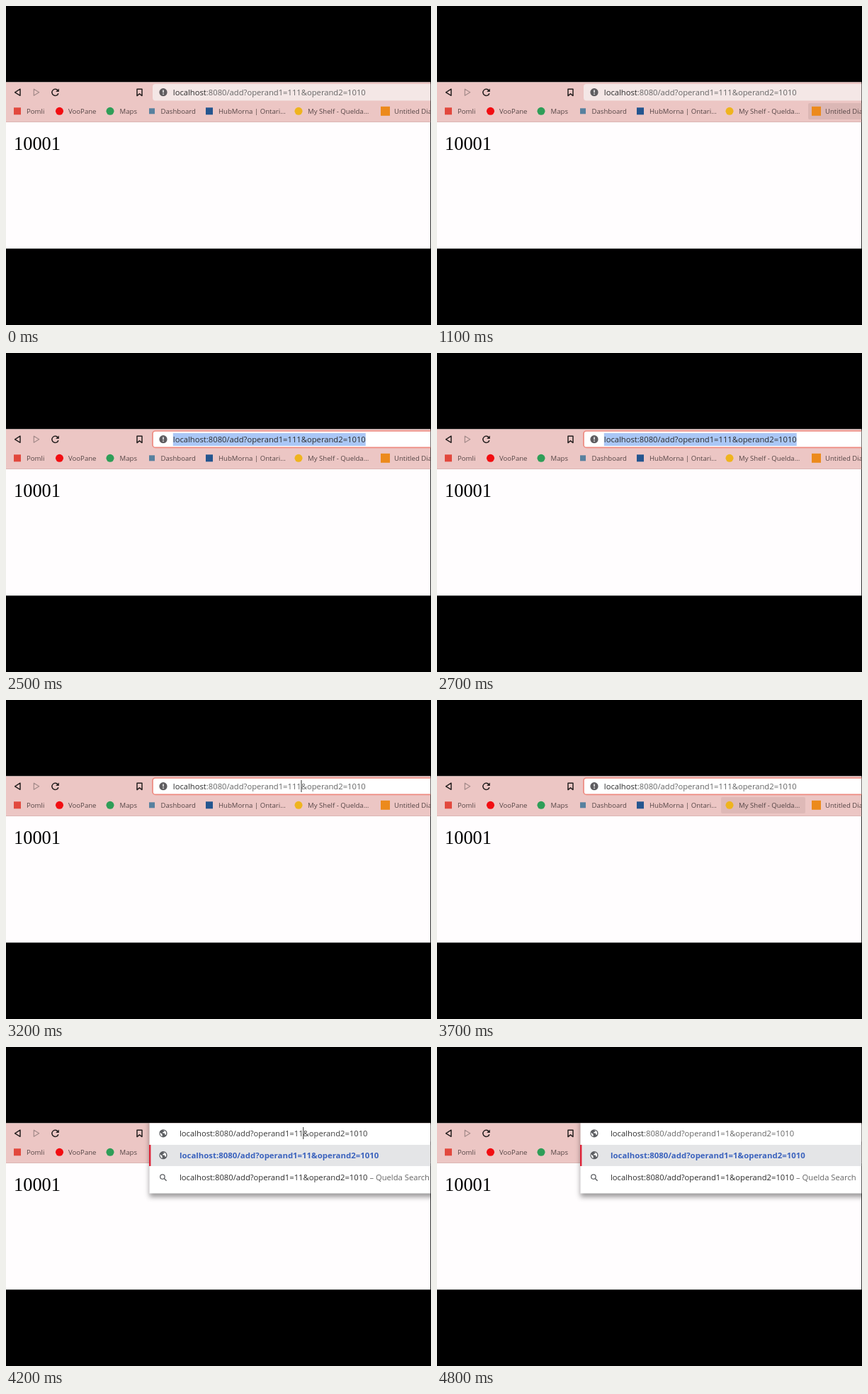
These frames come from a looping animation (600x450 px, 5 s). An HTML page:

```html
<!DOCTYPE html>
<html lang="en">
<head>
<meta charset="utf-8">
<title>Binary calculator in the address bar</title>
<style>
  html, body { margin: 0; width: 100%; height: 100%; overflow: hidden; background: #000; }
  svg { display: block; width: 600px; height: 450px; }
  text { white-space: pre; }
  .ui { font: 11.22px "Open Sans", "Noto Sans", sans-serif; fill: #2c2c2c; }
  .ui .dim { fill: #666; }
  .strong { font-size: 11.4px; font-weight: 700; fill: #3a62bd; }
  .marks text { font: 9.6px "Open Sans", "Noto Sans", sans-serif; fill: #554545; }
  .result { font: 26.4px "Liberation Serif", "Times New Roman", serif; fill: #000; }
  .line { fill: none; stroke: #262020; stroke-width: 1.5; stroke-linejoin: round; }
  #panel { filter: drop-shadow(0 5px 3.5px rgba(0, 0, 0, .4)); }
</style>
</head>
<body>
<svg viewBox="0 0 600 450">
  <defs>
    <clipPath id="view"><rect y="107.4" width="599.2" height="234.8"/></clipPath>
    <g id="globe">
      <circle r="5.6" fill="#5c5e62"/>
      <path d="M-4.4-1.4L-1.4 1.4V4.3C-3.5 3.6-4.7 1.5-4.4-1.4ZM-.6-4.3H1.6L1.3-2.4-.6-1.8-.8-.2H1.8L2.4 1.8 3.6 2.3C4.6.6 4.4-1.8 3-3.2" fill="#fff"/>
    </g>
  </defs>
  <rect width="600" height="450"/>
  <g clip-path="url(#view)">
    <rect y="107" width="600" height="236" fill="#fffdfe"/>
    <rect y="107" width="600" height="57" fill="#ecc6c4"/>
    <rect y="163" width="600" height="1" fill="#dcb6b4"/>
    <text class="result" x="11" y="202.5">10001</text>

    <path class="line" d="M20 117.2V126.3L12.6 121.8Z"/>
    <path class="line" d="M39.3 117.2V126.3L46.7 121.8Z" style="stroke:#a48b8a;stroke-width:1.2"/>
    <path class="line" d="M73.2 119.2A4.6 4.6 0 1 0 73.9 123.2"/>
    <path d="M74.8 116.4V121H70.2Z" fill="#262020"/>
    <path class="line" d="M185 117.3H192V126.6L188.5 123.8 185 126.6Z"/>

    <rect id="hoverDiagram" x="524" y="137" width="90" height="23" rx="2" fill="#dbb7b5"/>
    <rect id="hoverShelf" x="401" y="137" width="119" height="23" rx="2" fill="#dbb7b5"/>
    <g class="marks" id="marks"></g>

    <rect id="bar" x="207" y="110" width="410" height="23.5" rx="4"/>
    <rect id="ring" x="207" y="110" width="410" height="23.4" rx="4" fill="none" stroke="#ee8a80" stroke-width="1.7"/>

    <g id="popup">
      <rect id="panel" x="202.5" y="100" width="420" height="106.5" fill="#fff"/>
      <rect x="202.5" y="138" width="400" height="30" fill="#e4e5e7"/>
      <rect x="202" y="138" width="2.4" height="30" fill="#de2338"/>
      <use href="#globe" x="222" y="152.7"/>
      <text class="ui strong" id="match" x="245" y="156.8"/>
      <circle class="line" cx="220.9" cy="183.1" r="3.2" style="stroke:#5f6165;stroke-width:1.3"/>
      <path class="line" d="M223.3 185.5L226.6 188.8" style="stroke:#5f6165"/>
      <text class="ui" x="245" y="188.2"><tspan id="query"></tspan><tspan class="dim"> – Quelda Search</tspan></text>
    </g>

    <g id="info">
      <circle cx="222" cy="121.7" r="5.6" fill="#5f5d60"/>
      <path d="M222 118.4V122.2M222 123.6V125" stroke="#fff" stroke-width="1.4"/>
    </g>
    <use id="site" href="#globe" x="222" y="121.8"/>
    <rect id="selection" y="113" height="18" fill="#aac7f6"/>
    <text class="ui" id="address" y="125.9"><tspan>localhost</tspan><tspan id="path"></tspan></text>
    <rect id="caret" y="113" width="1" height="17" fill="#333"/>
  </g>
</svg>
<script>
const LOOP = 5000;
const HOST = "localhost";
const $ = id => document.getElementById(id);

// label, text x, icon x, icon radius, icon colour, square icon
const bookmarks = [
  ["Pomli", 29, 16, 5, "#e2483d", true],
  ["VooPane", 88, 75.5, 5.5, "#f20d12", false],
  ["Maps", 160.5, 147, 5.5, "#2f9e58", false],
  ["Dashboard", 218.5, 206, 4, "#58819f", true],
  ["HubMorna | Ontari...", 300, 287, 5, "#24558f", true],
  ["My Shelf - Quelda...", 426, 413, 5.5, "#efb41e", false],
  ["Untitled Diagram", 548, 535.5, 6.5, "#ec8a1c", true]
];
$("marks").innerHTML = bookmarks.map(([label, x, cx, r, color, square]) =>
  `<rect x="${cx - r}" y="${148.3 - r}" width="${2 * r}" height="${2 * r}" rx="${square ? 0 : r}" fill="${color}"/>` +
  `<text x="${x}" y="152">${label}</text>`).join("");

// Each step overrides only what it names.
const steps = [
  [0, { operand: "111", bar: "#f4e7e6", diagram: 0, shelf: 0, popup: 0,
        ring: 0, selected: 0, caret: 0, typed: 0, dim: "#666" }],
  [700, { diagram: .15 }],
  [800, { diagram: .4 }],
  [900, { diagram: .7 }],
  [1000, { diagram: .9 }],
  [1100, { diagram: 1 }],
  [1300, { diagram: .4 }],
  [1400, { diagram: 0 }],
  [1700, { bar: "#f0e3e1" }],
  [1800, { bar: "#ecdfdd" }],
  [2200, { bar: "#fff", ring: 1, selected: 1, dim: "#2c2c2c" }],
  [3200, { selected: 0, caret: 1, dim: "#666" }],
  [3600, { shelf: .4 }],
  [3700, { shelf: .8, caret: 0 }],
  [3800, { shelf: 1 }],
  [4000, { operand: "11", typed: 1, ring: 0, caret: 1, popup: .1, dim: "#3c3c3c" }],
  [4100, { popup: .65 }],
  [4200, { popup: 1 }],
  [4300, { operand: "1" }],
  [4400, { dim: "#666" }],
  [4800, { caret: 0 }]
];
let last = {};
const states = steps.map(([at, change]) => ({ at, ...(last = { ...last, ...change }) }));

const show = (id, opacity) => $(id).setAttribute("opacity", opacity);

function render(s) {
  const before = `:8080/add?operand1=${s.operand}`;
  const path = `${before}&operand2=1010`;
  const x = s.typed ? 245 : 235.8;
  const address = $("address");

  $("path").textContent = path;
  $("path").style.fill = s.dim;
  $("match").textContent = $("query").textContent = HOST + path;
  address.setAttribute("x", x);
  $("selection").setAttribute("x", x);
  $("selection").setAttribute("width", address.getComputedTextLength());
  $("caret").setAttribute("x", x + address.getSubStringLength(0, (HOST + before).length) - .3);
  $("bar").setAttribute("fill", s.bar);

  show("hoverDiagram", s.diagram);
  show("hoverShelf", s.shelf);
  show("ring", s.ring);
  show("popup", s.popup);
  show("info", 1 - s.typed);
  show("site", s.typed);
  show("selection", s.selected);
  show("caret", s.caret);
}

let current;
function tick() {
  const t = performance.now() % LOOP;
  const next = states.filter(s => s.at <= t).pop();
  if (next !== current) render(current = next);
  requestAnimationFrame(tick);
}
tick();
</script>
</body>
</html>
```
